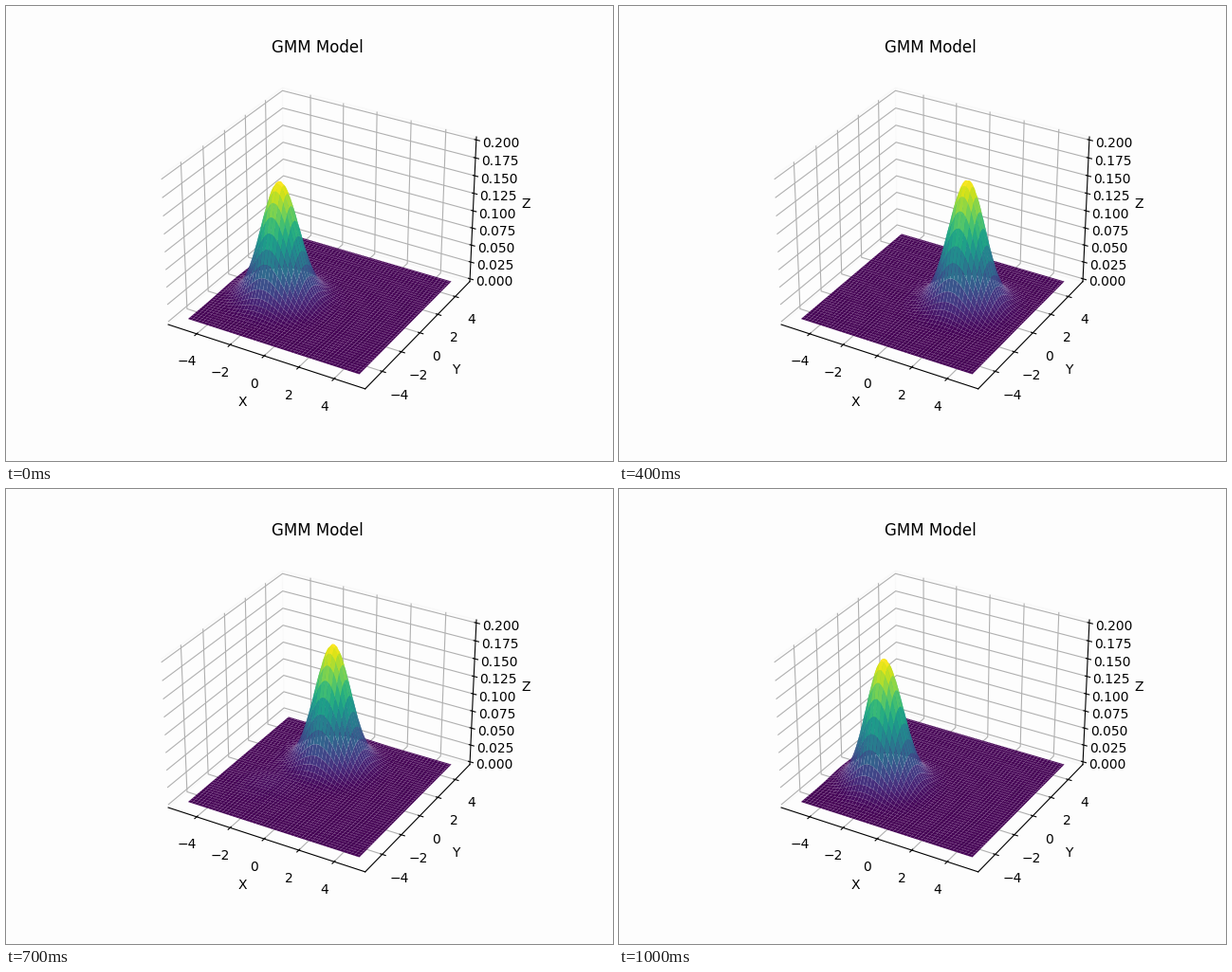
A matplotlib script for the animation above (1100 ms loop, 640x480 px).

```python
import numpy as np
import matplotlib.pyplot as plt
from matplotlib.animation import FuncAnimation

FRAMES, STEP = 11, 100
BG = "#fdfdfd"
SIDE = (-2.15, -1.55)

# stops of the main peak: front left, back left, right, back left, front left
STOPS = [0, 1, 2, 6, 8, 10]
PATH_X = [-1.99, -2.17, 1.45, 1.55, -2.53, -2.24]
PATH_Y = [-0.82, 1.56, 0.95, 0.95, 3.02, -1.22]
SIDE_SHARE = [0, 0.09, 0, 0, 0.05, 0]

axis = np.linspace(-5, 5, 100)
X, Y = np.meshgrid(axis, axis)


def gauss(mx, my, sigma):
    r2 = (X - mx) ** 2 + (Y - my) ** 2
    return np.exp(-r2 / (2 * sigma ** 2)) / (2 * np.pi * sigma ** 2)


def density(t):
    mx, my, share = (np.interp(t, STOPS, v) for v in (PATH_X, PATH_Y, SIDE_SHARE))
    if 2 < t < 6:  # slow sway while resting on the right
        sway = np.sin(np.pi * (t - 2) / 4)
        mx, my = mx + 0.09 * sway, my - 0.46 * sway
    sigma = 0.95 + 0.03 * max(0, 1 - t)
    return (1 - share) * gauss(mx, my, sigma) + share * gauss(*SIDE, sigma)


def padded(lo, hi):
    pad = (hi - lo) / 48
    return lo - pad, hi + pad


fig = plt.figure(figsize=(6.4, 4.8), dpi=100, facecolor=BG)
ax = fig.add_subplot(111, projection="3d", facecolor=BG)
ax.set(title="GMM Model", xlabel="X", ylabel="Y", zlabel="Z")
ax.set_xlim(*padded(-5.5, 5.5))
ax.set_ylim(*padded(-5.5, 5.5))
ax.set_zlim(*padded(0, 0.2))
for side in (ax.xaxis, ax.yaxis, ax.zaxis):
    side.pane.set_facecolor(BG)
    side.pane.set_edgecolor("#f5f5f5")

surfaces = []


def update(i):
    while surfaces:
        surfaces.pop().remove()
    surfaces.append(ax.plot_surface(X, Y, density(i), cmap="viridis"))
    return surfaces


anim = FuncAnimation(fig, update, frames=FRAMES, interval=STEP,
                     init_func=lambda: update(0), repeat=True, repeat_delay=0)
plt.show()
```
